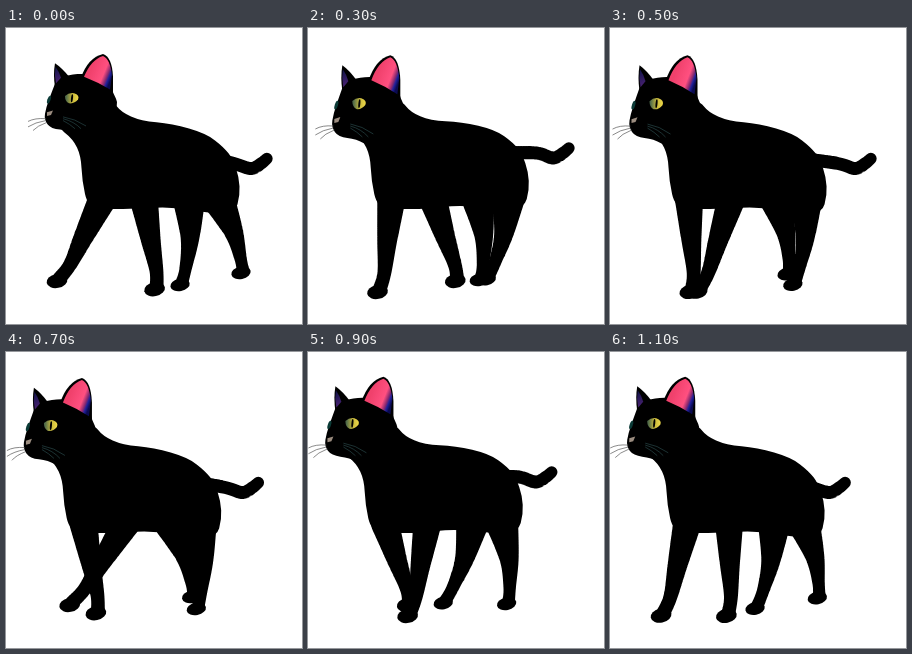
Animation of 296 by 296 pixels, one loop 1.2 s. Source, as an HTML page with a canvas:

```html
<!DOCTYPE html>
<html lang="en">
<head>
<meta charset="utf-8">
<title>Walking cat</title>
<style>
html, body { margin: 0; width: 100%; height: 100%; overflow: hidden; background: #fff; }
canvas { display: block; width: 100vw; height: 100vh; }
</style>
</head>
<body>
<canvas id="stage" width="296" height="296"></canvas>
<script>
const ctx = document.getElementById('stage').getContext('2d');
const { PI, sin, cos, exp, max, min, floor } = Math;

const CYCLE = 12; // beats per stride

// A paw travels from its front end (0) to its back end (1) of a fixed path
const front = {
  stance: 8, power: .55, radii: [14, 10, 7, 7], bend: 2,
  pawY: k => 264 - 11 * (1 - 2 * k) ** 4
};
const rear = {
  stance: 10, power: 1, radii: [16, 9.5, 6.3, 6.3], bend: 5,
  pawY: k => 251 + 6.5 * sin(1.6 * PI * k)
};
const legs = [
  { ...rear, hip: 183, from: 154, to: 204, landing: 8 },
  { ...rear, hip: 213, from: 191, to: 235, landing: 2 },
  { ...front, hip: 96, from: 51, to: 118, landing: 0 },
  { ...front, hip: 138, from: 82, to: 160, landing: 6 }
];

const mix = (a, b, k) => a + (b - a) * k;
const settle = (beat, rate) => 1 - exp(-beat / rate);

function fillShape(path, color) {
  ctx.fillStyle = color;
  ctx.fill(new Path2D(path));
}

function line(path, color, width) {
  ctx.strokeStyle = color;
  ctx.lineWidth = width;
  ctx.stroke(new Path2D(path));
}

function oval(x, y, rx, ry, angle, color) {
  ctx.beginPath();
  ctx.ellipse(x, y, rx, ry, angle, 0, 7);
  ctx.fillStyle = color;
  ctx.fill();
}

function blob(points, color) {
  const mid = (a, b) => [(a[0] + b[0]) / 2, (a[1] + b[1]) / 2];
  ctx.beginPath();
  ctx.moveTo(...mid(points.at(-1), points[0]));
  points.forEach((pt, i) => ctx.quadraticCurveTo(...pt, ...mid(pt, points[(i + 1) % points.length])));
  ctx.fillStyle = color;
  ctx.fill();
}

// Tapered limb: circles along a Catmull-Rom spline of [x, y, radius]
function limb(pts) {
  ctx.fillStyle = '#000';
  ctx.beginPath();
  for (let i = 0; i < pts.length - 1; i++) {
    const a = pts[max(i - 1, 0)], b = pts[i], c = pts[i + 1], d = pts[min(i + 2, pts.length - 1)];
    for (let s = 0; s <= 1; s += .04) {
      const [x, y, r] = b.map((v, n) => v + s / 2 * (c[n] - a[n]
        + s * (2 * a[n] - 5 * v + 4 * c[n] - d[n] + s * (3 * (v - c[n]) + d[n] - a[n]))));
      ctx.moveTo(x + r, y);
      ctx.arc(x, y, r, 0, 7);
    }
  }
  ctx.fill();
}

function drawLeg(leg, beat, shift) {
  const { stance, power, radii: [hipR, kneeR, ankleR, pawR] } = leg;
  const phase = (beat - leg.landing + CYCLE) % CYCLE;
  const k = phase < stance
    ? (phase / stance) ** power
    : ((CYCLE - phase) / (CYCLE - stance)) ** (1 / power);
  const hipX = leg.hip + shift, hipY = 172;
  const pawX = mix(leg.from, leg.to, k) + shift, pawY = leg.pawY(k);
  const joint = (t, offset, r) => [mix(hipX, pawX, t) + offset, mix(hipY, pawY, t), r];
  limb([[hipX, hipY, hipR], joint(.44, leg.bend, kneeR), joint(.79, 4, ankleR), [pawX + 2, pawY - 2, pawR]]);
  oval(pawX, pawY, pawR + 3.5, pawR, -.2, '#000');
}

function drawTorso(shift, drop) {
  const outline = [[106, 72], [115, 84], [135, 93], [166, 96], [200, 106], [218, 120], [227, 132], [233, 150], [234, 168],
    [229, 186], [205, 186], [165, 179], [130, 181], [104, 181], [82, 180], [76, 152], [75, 128], [67, 111], [50, 98], [70, 70]];
  blob(outline.map(([x, y]) => [x + shift, y + drop * max(0, x - 130) / 100]), '#000');
}

function drawTail(beat, shift, drop) {
  const x = 261 - 4.3 * max(0, beat - 4), y = 133 + 2 * drop;
  limb([[206 + shift, 131 + drop, 7], [x - 33, y + 4, 6.5], [x - 16, y + 9, 6.5], [x - 6, y + 4, 6.2], [x, y - 1, 5.8]]);
}

function drawHead(beat, shift) {
  const sway = sin(PI * beat / 6);
  ctx.save();
  ctx.translate(9 + 1.15 * shift, 27 + 1.5 * sway);
  ctx.scale(1, .91 + .07 * settle(beat, .5) + .02 * sway);
  ctx.translate(0, -28);

  blob([[42, 54], [37, 68], [31, 86], [29, 99], [36, 109], [54, 111], [70, 120], [92, 106], [104, 82],
    [98, 70], [94, 54], [72, 48], [53, 50]], '#000');

  fillShape('M40 37Q47 42 55 53L40 63Q38 49 40 37Z', '#000');
  const farEar = ctx.createLinearGradient(40, 42, 46, 58);
  farEar.addColorStop(0, '#12144a');
  farEar.addColorStop(1, '#4b2273');
  fillShape('M40.5 41Q44 46 46 53L41 59Q39 50 40.5 41Z', farEar);

  fillShape('M66 53Q73 31 88 27Q97 30 98 52L98 72L84 68Z', '#000');
  const nearEar = ctx.createLinearGradient(76, 44, 97, 52);
  nearEar.addColorStop(0, '#f0416c');
  nearEar.addColorStop(.6, '#ff5080');
  nearEar.addColorStop(.78, '#8a2a70');
  nearEar.addColorStop(.88, '#20209a');
  nearEar.addColorStop(1, '#0a0a50');
  fillShape('M69 52Q76 33 88 29Q95 32 97 50L95 66Q83 58 69 52Z', nearEar);

  const iris = ctx.createLinearGradient(51, 0, 64, 0);
  iris.addColorStop(0, '#4f6a4a');
  iris.addColorStop(.5, '#c9b93c');
  iris.addColorStop(1, '#f2dc4a');
  fillShape('M50 73Q54 69 59 70Q65 72 63 77Q59 82 54 81Q50 79 50 73Z', iris);
  oval(57, 75.5, 1, 4.5, .1, '#000');
  oval(34, 77, 1.6, 4.5, .3, '#0b3a36');
  fillShape('M32 91L38 89L36 94L32 95Z', '#9c8d80');

  line('M31 98Q20 97 13 101M31 100Q20 102 13 107M32 102Q22 106 18 111', '#555', .7);
  line('M48 96Q60 98 71 106M48 98Q59 101 66 109M48 100Q55 104 60 109', '#29494a', .7);
  ctx.restore();
}

function draw(beat) {
  const shift = -19 * settle(beat, 1.8);
  const drop = -2.5 - 3.5 * cos(PI * (beat - 2) / 3);
  ctx.fillStyle = '#fff';
  ctx.fillRect(0, 0, 296, 296);
  drawTail(beat, shift, drop);
  legs.forEach(leg => drawLeg(leg, beat, shift));
  drawTorso(shift, drop);
  drawHead(beat, shift);
}

// One beat per 100 ms, with a single rest early in the loop
function frame(now) {
  const step = floor(now % 1200 / 100);
  draw(step < 3 ? min(step, 1) : step - 1);
  requestAnimationFrame(frame);
}
frame(0);
</script>
</body>
</html>
```
